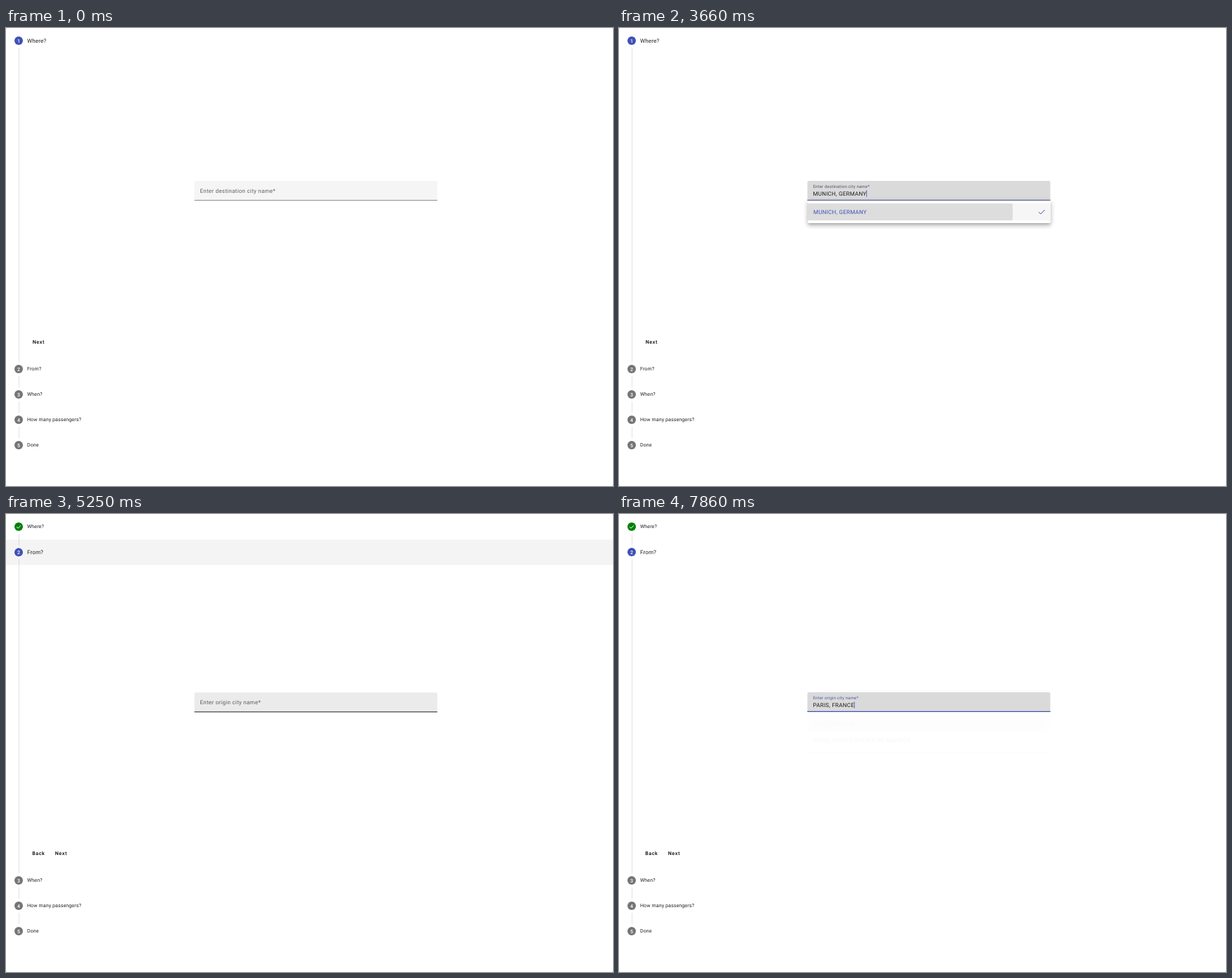
An HTML page that plays this animation: 862 px wide and 650 px high, repeating every 8 s.

```html
<!DOCTYPE html>
<html lang="en">
<head>
<meta charset="utf-8">
<title>Travel stepper</title>
<style>
  html, body { margin: 0; width: 100%; height: 100%; overflow: hidden; background: #fff; }
  svg { display: block; }
  text { font: 400 8px Roboto, sans-serif; letter-spacing: .03125em; fill: rgba(0,0,0,.87);
         text-rendering: geometricPrecision; white-space: pre; }
  .step { letter-spacing: .0178571em; font-size: 7px; }
  .number { font-size: 7px; font-weight: 500; letter-spacing: 0; fill: #fff; text-anchor: middle; }
  .button { font-size: 7px; font-weight: 500; letter-spacing: .0892857em; fill: #000; text-anchor: middle; }
  .check { fill: none; stroke-width: 1; }
  .panel { position: absolute; left: 267.5px; width: 345px; background: #fff; border-radius: 0 0 2px 2px;
           transform-origin: center top; opacity: 0;
           box-shadow: 0 2.5px 2.5px -1.5px rgba(0,0,0,.2), 0 4px 5px .5px rgba(0,0,0,.14),
                       0 1.5px 7px 1px rgba(0,0,0,.12); }
</style>
</head>
<body>
<script>
const LOOP = 8000, TICK = 30, BODY = 430, INDIGO = '#3f51b5';
const SVG = 'http://www.w3.org/2000/svg';

const clamp = v => Math.min(1, Math.max(0, v));
const ramp = (t, start, length) => clamp((t - start) / length);
const between = (t, a, b) => t >= a && t < b;
const latest = (table, t) => table.reduce((value, [at, next]) => t >= at ? next : value, '');

function bezier(x1, y1, x2, y2) {
  const axis = (a, b, s) => 3 * (1 - s) ** 2 * s * a + 3 * (1 - s) * s * s * b + s ** 3;
  return x => {
    let low = 0, high = 1;
    for (let i = 0; i < 24; i++) {
      const mid = (low + high) / 2;
      if (axis(x1, x2, mid) < x) low = mid; else high = mid;
    }
    return axis(y1, y2, high);
  };
}
const standard = bezier(.4, 0, .2, 1);
const decelerate = bezier(0, 0, .2, 1);

function set(node, attrs) {
  for (const key in attrs) node.setAttribute(key, attrs[key]);
  return node;
}
function add(parent, tag, attrs = {}, content) {
  const node = set(document.createElementNS(SVG, tag), attrs);
  if (content) node.textContent = content;
  return parent.appendChild(node);
}
const write = (node, value) => { if (node.textContent !== value) node.textContent = value; };

const stage = add(document.body, 'svg', { width: 862, height: 650 });
add(stage, 'rect', { width: 862, height: 650, fill: '#dedede' });
add(stage, 'rect', { width: 862, height: 650, rx: 2, fill: '#fff' });

function makeHeader(number, title) {
  const root = add(stage, 'g');
  const band = add(root, 'rect', { width: 862, height: 36, fill: '#000', opacity: 0 });
  const dot = add(root, 'circle', { cx: 18, cy: 18, r: 6 });
  const digit = add(root, 'text', { class: 'number', x: 18, y: 20.5 }, number);
  const check = add(root, 'path', { class: 'check', d: 'M15.2 18.2l2 2 3.7-3.9', stroke: '#fff' });
  const label = add(root, 'text', { class: 'step', x: 30 }, title);
  return (y, state, focused) => {
    const active = state === 'active', done = state === 'done';
    set(root, { transform: `translate(0 ${y})` });
    set(band, { opacity: focused ? .043 : 0 });
    set(dot, { fill: active ? INDIGO : done ? '#008000' : '#757575' });
    set(digit, { opacity: done ? 0 : 1 });
    set(check, { opacity: done ? 1 : 0 });
    set(label, { y: active ? 20.73 : 20.4 });
    label.style.fontSize = active ? '8px' : '7px';
  };
}

function makeButton(body, center, title) {
  const box = add(body, 'svg', { x: center - 16, y: 400.5, width: 32, height: 18 });
  const hover = add(box, 'rect', { width: 32, height: 18, rx: 2, opacity: 0 });
  const ripple = add(box, 'circle', { cx: 16, cy: 9, r: 0, opacity: .1 });
  add(box, 'text', { class: 'button', x: 16.3, y: 11.4 }, title);
  return (hovered, radius) => {
    set(hover, { opacity: hovered ? .04 : 0 });
    set(ripple, { r: radius });
  };
}

function makeField(body, title, cfg) {
  const root = add(body, 'g', { transform: 'translate(267.5 181)' });
  const shape = 'M0 28V2a2 2 0 0 1 2-2H343a2 2 0 0 1 2 2V28Z';
  add(root, 'path', { d: shape, fill: '#f5f5f5' });
  const overlay = add(root, 'path', { d: shape });
  const line = add(root, 'rect', { y: 27, width: 345, height: 1 });
  const active = add(root, 'rect', { y: 26.75, height: 1.25, fill: INDIGO });
  const label = add(root, 'text', {}, title);
  const input = add(root, 'text', { x: 8, y: 20.73 });
  const caret = add(root, 'rect', { y: 13.3, width: .8, height: 9.4, fill: INDIGO });

  return t => {
    const kept = 1 - ramp(t, cfg.blur, 150);
    const grow = standard(ramp(t, cfg.focus, 180));
    const float = standard(ramp(t, cfg.focus, 150));
    const hovered = between(t, ...cfg.hover);
    // choosing an option takes the focus away for a moment
    const dip = .7 * (1 - Math.abs(clamp((t - cfg.pick + 15) / 150) * 2 - 1));
    const tint = float * kept * (1 - dip);

    set(overlay, { opacity: Math.max(hovered ? .04 : 0, .11 * grow * kept) });
    set(line, { opacity: hovered ? .87 : .42 });
    set(active, { x: 172.5 * (1 - grow), width: 345 * grow, opacity: kept * (1 - dip * .7) });
    set(label, {
      transform: `translate(8 ${16.75 - 7 * float}) scale(${1 - .25 * float})`,
      fill: 'none'
    });
    label.style.fill = `rgba(${63 * tint},${81 * tint},${181 * tint},${.6 + .27 * tint})`;

    const value = latest(cfg.typing, t);
    write(input, value);
    set(caret, {
      x: 7.9 + (value ? input.getComputedTextLength() : 0),
      opacity: cfg.caret.some(span => between(t, ...span)) ? 1 : 0
    });
  };
}

function makePanel(top, options, cfg) {
  const height = 8 + 24 * options.length;
  const panel = document.body.appendChild(document.createElement('div'));
  panel.className = 'panel';
  panel.style.top = top + 'px';
  panel.style.height = height + 'px';
  const root = add(panel, 'svg', { width: 345, height });
  const row = add(root, 'svg', { y: 4, width: 345, height: 24 });
  const hover = add(row, 'rect', { width: 345, height: 24 });
  const ripple = add(row, 'circle', { cx: 117.5, cy: 12, opacity: .1 });
  const texts = options.map((name, i) => add(root, 'text', { x: 8, y: 18.73 + 24 * i }, name));
  const check = add(row, 'path', { class: 'check', d: 'M328 12.2l2.8 2.8 5.8-6', stroke: INDIGO });

  return t => {
    const opening = decelerate(ramp(t, cfg.open, 120));
    const closing = 1 - .97 * ramp(t, cfg.pick + 60, 60);
    const gone = t >= cfg.pick + 150;
    const chosen = t >= cfg.pick + 30;
    panel.style.opacity = gone ? 0 : opening * closing;
    panel.style.transform = `scaleY(${.8 + .2 * opening})`;
    set(hover, { opacity: t >= cfg.pick - 150 ? .035 : 0 });
    set(ripple, { r: t < cfg.pick ? 0 : 230 * decelerate(ramp(t, cfg.pick - 30, 225)) });
    set(check, { opacity: chosen ? 1 : 0 });
    texts[0].style.fill = chosen ? INDIGO : 'rgba(0,0,0,.87)';
  };
}

const destination = {
  hover: [450, 3000], focus: 610, open: 3130, pick: 3600, blur: 4230,
  typing: [[1260, 'M'], [1440, 'Mu'], [1560, 'Mun'], [1740, 'Muni'], [1950, 'Munic'], [2100, 'Munich'],
           [3630, 'MUNICH, GERMANY']],
  caret: [[630, 1140], [1650, 2160], [2670, 3180], [3630, 4170]]
};
const origin = {
  hover: [5250, 7300], focus: 5555, open: 7360, pick: 7740, blur: Infinity,
  typing: [[6180, 'P'], [6330, 'Pa'], [6510, 'Par'], [6600, 'Pari'], [6750, 'Paris'],
           [7770, 'PARIS, FRANCE']],
  caret: [[5580, 6060], [6570, 7080], [7590, LOOP]]
};
const SWITCH = 4290;

const bodies = [0, 1].map(() => add(stage, 'svg', { width: 862, height: 0 }));
const fields = [
  makeField(bodies[0], 'Enter destination city name*', destination),
  makeField(bodies[1], 'Enter origin city name*', origin)
];
const nextButton = makeButton(bodies[0], 46, 'Next');
makeButton(bodies[1], 46, 'Back');
makeButton(bodies[1], 78, 'Next');
const headers = ['Where?', 'From?', 'When?', 'How many passengers?', 'Done']
  .map((title, i) => makeHeader(i + 1, title));
const rails = [0, 1, 2, 3].map(() => add(stage, 'rect', { x: 18, width: 1, fill: '#000', opacity: .11 }));
const panels = [
  makePanel(245, ['MUNICH, GERMANY'], destination),
  makePanel(281, ['PARIS, FRANCE', 'PARIS, UNITED STATES OF AMERICA'], origin)
];

function render(t) {
  const moved = BODY * standard(ramp(t, SWITCH, 1000));
  const heights = [BODY - moved, moved, 0, 0, 0];
  const current = t < SWITCH ? 0 : 1;
  let y = 0;
  headers.forEach((draw, i) => {
    const state = i === current ? 'active' : i < current ? 'done' : 'waiting';
    draw(y, state, i === 1 && between(t, SWITCH, 5580));
    y += 36;
    if (bodies[i]) set(bodies[i], { y, height: heights[i] });
    if (rails[i]) set(rails[i], { y: y - 8, height: heights[i] + 16 });
    y += heights[i];
  });
  fields.forEach(draw => draw(t));
  panels.forEach(draw => draw(t));
  nextButton(t >= 4200, 22 * decelerate(ramp(t, 4200, 225)));
}

function frame() {
  const t = performance.now() % LOOP;
  render(t - t % TICK);
  requestAnimationFrame(frame);
}
frame();
</script>
</body>
</html>
```
